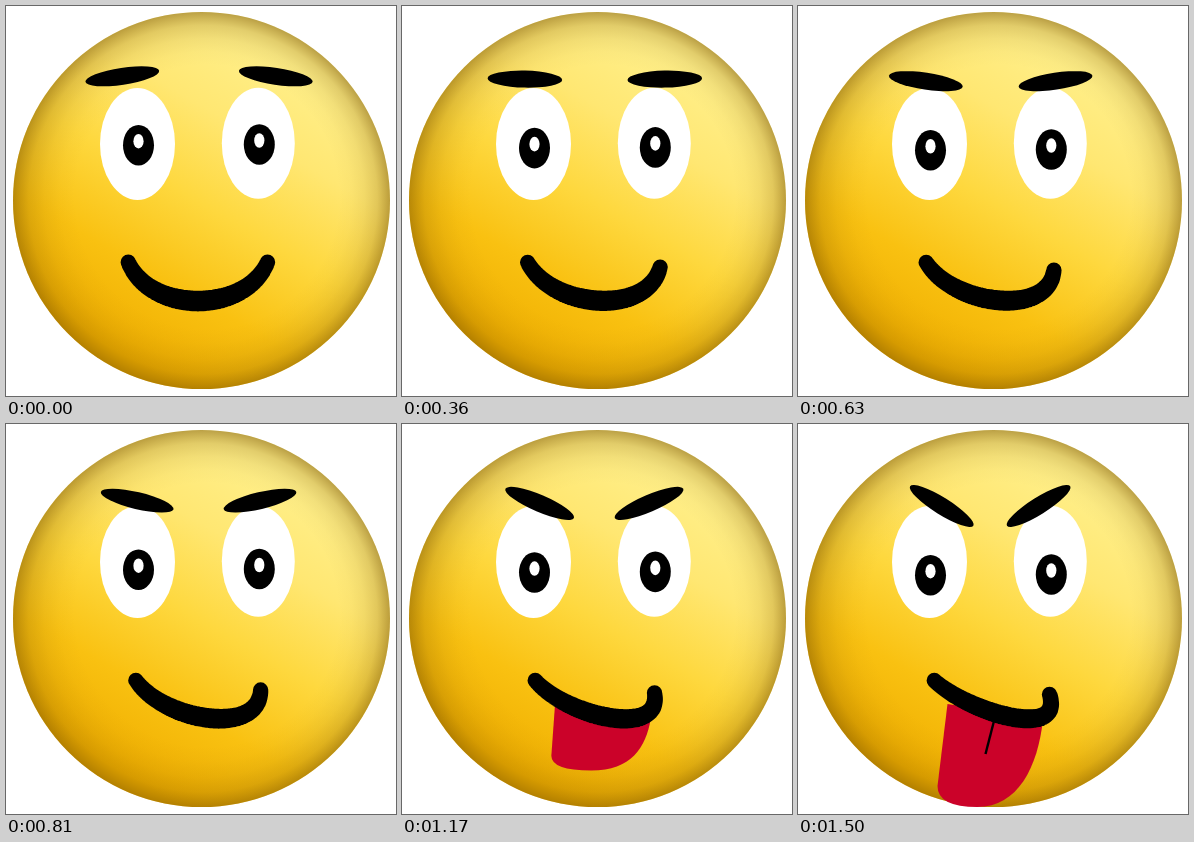
An HTML page with a canvas that plays this animation: 390 by 390 pixels, repeating every 2.87 s.

```html
<!DOCTYPE html>
<html>
<head>
<meta charset="utf-8">
<style>
html, body { margin: 0; width: 100%; height: 100%; overflow: hidden; background: #fff; }
canvas { display: block; }
</style>
</head>
<body>
<canvas id="c" width="390" height="390"></canvas>
<script>
const ctx = document.getElementById('c').getContext('2d');
const LOOP = 2870, STEP = 30, MOVE = 1500, TONGUE_START = 830;
const mix = (a, b, k) => a + (b - a) * k;
const cubic = (a, b, c, d, s) => {
  const u = 1 - s;
  return u * u * u * a + 3 * u * u * s * b + 3 * u * s * s * c + s * s * s * d;
};

function ellipse(x, y, rx, ry, color, deg = 0) {
  ctx.fillStyle = color;
  ctx.beginPath();
  ctx.ellipse(x, y, rx, ry, deg * Math.PI / 180, 0, 7);
  ctx.fill();
}

function gradient(g, ...colors) {
  colors.forEach((color, i) => g.addColorStop(i / (colors.length - 1), color));
  return g;
}

const skin = gradient(ctx.createLinearGradient(280, 50, 110, 345),
  '#fff08c', '#ffe772', '#fed83e', '#f9c111', '#efae00');
const rim = gradient(ctx.createRadialGradient(201, 191, 132, 195.5, 194.5, 188.5),
  'rgba(130,90,0,0)', 'rgba(130,90,0,.03)', 'rgba(130,90,0,.1)',
  'rgba(130,90,0,.23)', 'rgba(120,82,0,.5)');

function eye(x, y, rx, ry, look) {
  ellipse(x, y, rx, ry, '#fff');
  ellipse(x + 1, y + 1.2 + look, 15.5, 20.3, '#000');
  ellipse(x + 1, y - 2.8 + look, 5.1, 7.3, '#fff');
}

function tongue(t) {
  const q = (t - TONGUE_START) / (MOVE - TONGUE_START);
  if (q < 0) return;
  const k = q ** 0.8;
  const left = mix(163, 139.5, k), right = mix(254, 245, k);
  const top = 295, bottom = mix(296, 383, k);
  ctx.fillStyle = '#cb0229';
  ctx.beginPath();
  ctx.moveTo(mix(158, 149.5, k), 280);
  ctx.lineTo(left, bottom - mix(6, 21, k));
  ctx.quadraticCurveTo(left, bottom, left + 40, bottom);
  ctx.bezierCurveTo(left + 80, bottom, right - 5, mix(top, bottom, 0.55), right, top);
  ctx.fill();

  const rest = MOVE - t, tip = 330 - rest * 0.105;
  if (tip < top) return;
  ctx.lineWidth = 2.4;
  ctx.beginPath();
  ctx.moveTo(196.5, top);
  ctx.lineTo(187.5 + rest * 0.035, tip);
  ctx.stroke();
}

// A brush drawn along a curve, thickest in the middle
function mouth(p) {
  const early = 1 - (1 - p) ** 1.5; // the right corner moves ahead
  const x = [mix(122.3, 136.3, p), mix(145, 170, p), mix(239, 266, p), mix(261.5, 251.5, early)];
  const y = [mix(256.3, 256.5, p), mix(308, 288, p), mix(308, 317, p), mix(256.3, 270.5, early)];
  ctx.fillStyle = '#000';
  ctx.beginPath();
  for (let s = 0; s <= 1; s += 1 / 128) {
    const r = 7.7 + mix(2.6, 1.9, p) * Math.sin(Math.PI * s);
    const cx = cubic(...x, s), cy = cubic(...y, s);
    ctx.moveTo(cx + r, cy);
    ctx.arc(cx, cy, r, 0, 7);
  }
  ctx.fill();
}

function draw(t) {
  const p = t / MOVE;
  ctx.fillStyle = '#fff';
  ctx.fillRect(0, 0, 390, 390);
  ellipse(195.5, 194.5, 188.5, 188.5, skin);
  ellipse(195.5, 194.5, 188.5, 188.5, rim);

  eye(131.5, 138, 37.5, 56, 12 * p);
  eye(252.3, 137.3, 36.5, 55.5, 12 * p);

  const browY = mix(70.3, 82, p), tilt = mix(-8.5, 32, p);
  ellipse(mix(116.3, 143.7, p), browY, 37.3, 8.5, '#000', tilt);
  ellipse(mix(269.8, 240.6, p), browY, 37.3, 8.5, '#000', -tilt);

  tongue(t);
  mouth(p);
}

function frame() {
  const t = Math.floor(performance.now() % LOOP / STEP) * STEP;
  draw(Math.min(t, MOVE));
  requestAnimationFrame(frame);
}
frame();
</script>
</body>
</html>
```
